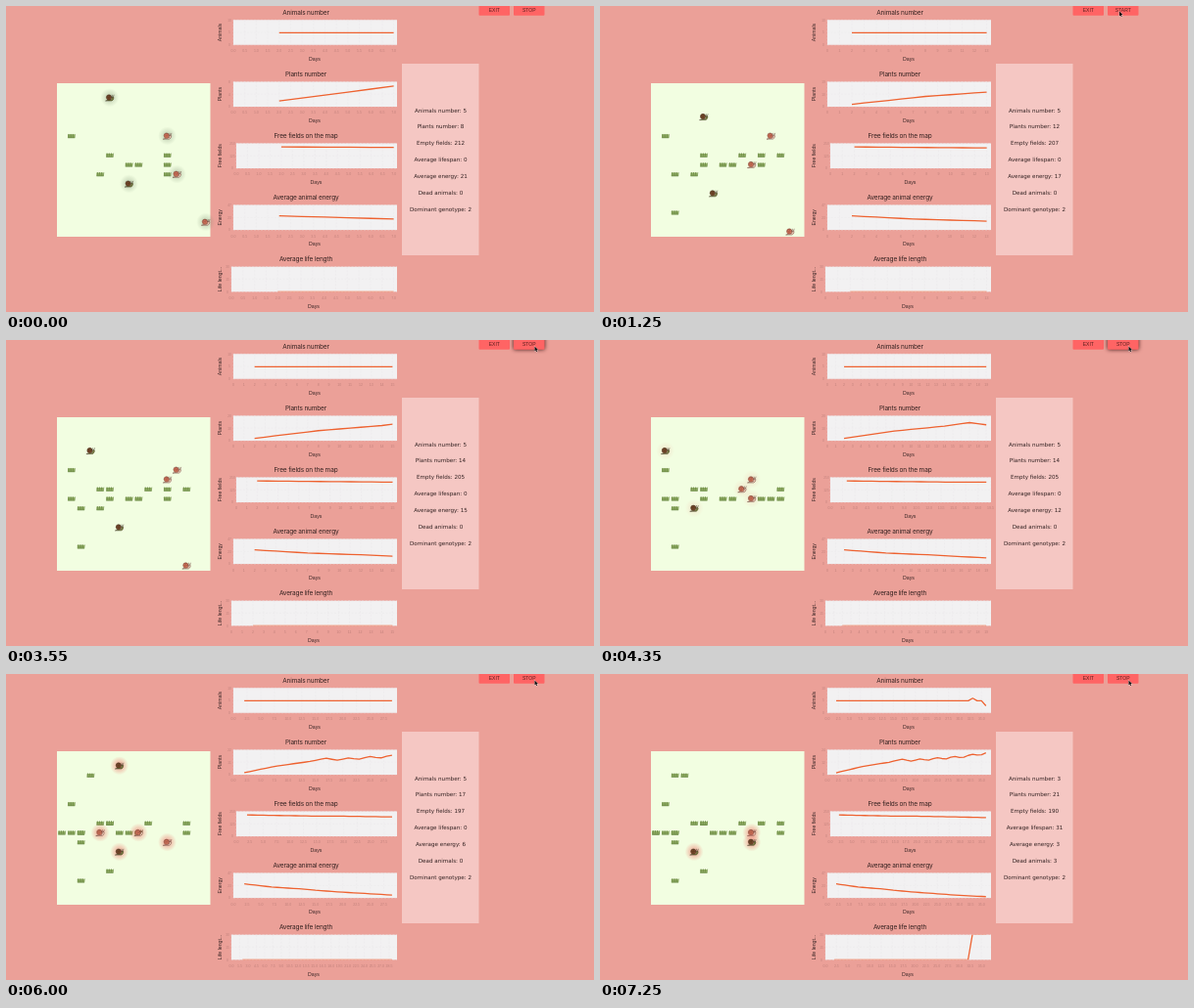
Write an HTML page with a canvas that moves like this. It is 600 by 313 pixels and loops after 7.3 s.

```html
<!DOCTYPE html>
<html lang="en">
<head>
<meta charset="utf-8">
<title>Animal simulation</title>
<style>
html, body { margin: 0; width: 100%; height: 100%; overflow: hidden; background: #eba098; }
canvas { display: block; width: 600px; height: 313px; }
</style>
</head>
<body>
<canvas id="stage"></canvas>
<script>
const LOOP = 7300, STEP = 50, RESUME = 3190;
const TITLE = 'Inter, Arial, sans-serif';
const SANS = '"Liberation Sans", Arial, sans-serif';
const WIDE = '"DejaVu Sans", Verdana, sans-serif';
const canvas = document.getElementById('stage');
const ctx = canvas.getContext('2d');
const dpr = window.devicePixelRatio || 1;
canvas.width = 600 * dpr;
canvas.height = 313 * dpr;

const clamp = v => Math.max(0, Math.min(1, v));
const ease = v => v * v * (3 - 2 * v);
const mix = (a, b, k) => a + (b - a) * k;
const random = n => { const v = Math.sin(n * 12.9898) * 43758.5453; return v - Math.floor(v); };

// Piecewise linear value through the points (xs[i], ys[i])
function lerp(xs, ys, x) {
  if (x <= xs[0]) return ys[0];
  for (let i = 1; i < ys.length; i++)
    if (x < xs[i]) return mix(ys[i - 1], ys[i], (x - xs[i - 1]) / (xs[i] - xs[i - 1]));
  return ys[ys.length - 1];
}

// Simulated day: runs, pauses on day 13, runs again
const dayAt = t => t < RESUME
  ? 7 + Math.min(6, Math.floor(t / 172))
  : 13 + Math.floor((t - RESUME) / 175);

// Key days of the simulation; values between them are interpolated
const stops = [7, 13, 15, 19, 29, 36];
const census = (...values) => d => lerp([1, ...stops], values, d);
const plantCount = census(2, 8, 12, 14, 14, 17, 21);
const emptyCount = census(218, 212, 207, 205, 205, 197, 190);
const energy = census(28, 21, 17, 15, 12, 6, 3);
const lifespan = d => d < 33 ? 0 : 31;

// Cell of each snail at the key days
const snails = [
  { dark: true, cols: [5, 5, 3, 1, 6, 8], rows: [1, 3, 3, 3, 1, 3], dies: 34 },
  { cols: [11, 12, 12, 10, 11, 10], rows: [5, 5, 5, 6, 9, 8] },
  { cols: [12, 10, 11, 9, 4, 3], rows: [9, 8, 6, 7, 8, 11], dies: 36 },
  { dark: true, cols: [7, 6, 6, 4, 6, 4], rows: [10, 11, 11, 9, 10, 10] },
  { cols: [15, 14, 13, 10, 8, 9], rows: [14, 15, 15, 8, 8, 10], dies: 36 },
  { dark: true, cols: [10], rows: [9], born: 33 }
];
const isDead = (s, d) => d >= (s.dies || Infinity);
const living = d => snails.filter(s => d >= (s.born || 0) && !isDead(s, d));

// Column, row and, where eaten, the day; in order of growth
const plants = [
  [1, 5], [5, 7], [4, 9, 17], [7, 8], [8, 8, 30], [11, 7, 18], [11, 8, 24], [11, 9, 9],
  [5, 8, 26], [2, 9], [9, 7, 19], [13, 7], [2, 13], [4, 7], [1, 8], [2, 8, 32],
  [12, 8, 25], [13, 8]
];
// Later plants sprout at random, mostly around the equator
for (let i = plants.length; i < 30; i++) {
  const row = i % 4 ? 7 + random(i) * 3 : random(i) * 16;
  plants.push([Math.floor(random(i + 50) * 16), Math.floor(row)]);
}
const sprout = i => i < 8 ? 0 : Math.floor(8 + (i - 8) * 1.25);

const charts = [
  { title: 'Animals number', label: 'Animals', left: 232, top: () => 10,
    value: d => living(d).length },
  { title: 'Plants number', label: 'Plants', left: 232,
    top: d => d < 10 ? 1.2 * d : 16.5 + .2 * d,
    value: d => plantCount(d - 1) + (d > 15 ? .9 * Math.sin((d - 16) * 1.6) : 0) },
  { title: 'Free fields on the map', label: 'Free fields', left: 235, top: () => 250,
    value: emptyCount },
  { title: 'Average animal energy', label: 'Energy', left: 232, top: () => 46.5, value: energy },
  { title: 'Average life length', label: 'Life lengt...', left: 230, top: () => 30,
    value: lifespan }
];

// Pointer moves: begin, end, target x, target y
const moves = [[700, 1000, 530, 5.5], [1350, 1750, 153, 162],
  [1850, 2200, 186, 46], [2300, 3050, 539.5, 6.5]];

function text(str, x, y, size, family, color = '#3a2626') {
  ctx.font = size + 'px ' + family;
  ctx.fillStyle = color;
  ctx.textAlign = 'center';
  ctx.textBaseline = 'middle';
  ctx.fillText(str, x, y + .5);
}
function lines(list, x, y, gap, size) {
  list.forEach((s, i) => text(s, x, y + i * gap, size, WIDE, '#332222'));
}
function box(x, y, w, h, color, r = 0) {
  ctx.fillStyle = color;
  ctx.beginPath();
  ctx.roundRect(x, y, w, h, r);
  ctx.fill();
}
function disc(x, y, r, color) {
  ctx.fillStyle = color;
  ctx.beginPath();
  ctx.arc(x, y, r, 0, 7);
  ctx.fill();
}

function drawChart(c, i, day) {
  const y = 14.3 + i * 63.1, h = 25.5, right = 399, w = right - c.left;
  const unit = w / (1.035 * day - .1);
  const top = c.top(day);
  ctx.letterSpacing = '-0.16px';
  text(c.title, 306, y - 7.8, 6.5, TITLE, '#33201f');
  ctx.letterSpacing = '0px';
  text('Days', (c.left + right) / 2 - .5, y + 39.9, 5.2, SANS);
  ctx.save();
  ctx.translate(218, y + h / 2);
  ctx.rotate(-Math.PI / 2);
  text(c.label, 0, 0, 5.2, SANS);
  ctx.restore();

  box(c.left, y, w, h, '#f2f1f2');
  const faint = 'rgba(120,75,75,.36)';
  const step = [.5, 1, 1.5, 2.5].find(s => s * unit >= 8.4) || 5;
  ctx.strokeStyle = '#e8e6e7';
  ctx.lineWidth = .4;
  ctx.setLineDash([2, 1.5]);
  ctx.beginPath();
  for (let x = 0; x * unit <= w + .1; x += step) {
    ctx.moveTo(c.left + x * unit, y);
    ctx.lineTo(c.left + x * unit, y + h);
    text(x.toFixed(step % 1 ? 1 : 0), c.left + x * unit, y + 31.5, 3.5, SANS, faint);
  }
  for (let k = 0; k <= 1; k += .5) {
    ctx.moveTo(c.left, y + h * k);
    ctx.lineTo(right, y + h * k);
    text(Math.round(top * (1 - k)), c.left - 4, y + h * k, 3.2, SANS, faint);
  }
  ctx.stroke();
  ctx.setLineDash([]);

  ctx.save();
  ctx.beginPath();
  ctx.rect(c.left, y, w + .5, h);
  ctx.clip();
  ctx.beginPath();
  for (let d = 2; d <= day; d++)
    ctx.lineTo(c.left + d * unit, y + .3 + h * (1 - c.value(d) / top));
  ctx.strokeStyle = '#ee6230';
  ctx.lineWidth = 1.3;
  ctx.lineJoin = 'round';
  ctx.stroke();
  ctx.restore();
}

function drawPlant(x, y) {
  box(x - 3.6, y - 1.5, 7.2, 3.6, '#9cb76a', .6);
  ctx.strokeStyle = '#5c7d3c';
  ctx.lineWidth = .5;
  ctx.beginPath();
  for (let k = -3; k <= 3; k++) {
    ctx.moveTo(x + k * 1.1, y + 2);
    ctx.lineTo(x + k * 1.1 + (k % 2 ? .5 : -.5), y - 1.9);
  }
  ctx.moveTo(x - 3.6, y + 2);
  ctx.lineTo(x + 3.6, y + 2);
  ctx.stroke();
}

// Unit design is about 21 by 17
function drawSnail(x, y, scale, dark) {
  ctx.save();
  ctx.translate(x, y);
  ctx.scale(scale, scale);
  ctx.strokeStyle = dark ? '#33281a' : '#5a2c25';
  ctx.lineWidth = scale < 1 ? 1.1 : .7;
  ctx.lineCap = 'round';
  ctx.fillStyle = dark ? '#7d8540' : '#f9d8c2';
  ctx.beginPath();
  ctx.moveTo(-10, 8);
  ctx.quadraticCurveTo(-3, 5, 4, 5.5);
  ctx.quadraticCurveTo(6, 3, 5.5, 0);
  ctx.quadraticCurveTo(8, -3.5, 10.5, 0);
  ctx.quadraticCurveTo(9.5, 7, 6, 8);
  ctx.closePath();
  ctx.fill();
  ctx.stroke();
  ctx.beginPath();
  ctx.moveTo(7, -1.5);
  ctx.lineTo(6, -6.5);
  ctx.moveTo(9, -1.5);
  ctx.lineTo(10.5, -6.5);
  ctx.stroke();
  disc(-2, -.7, 6.6, dark ? '#8a5230' : '#f0886a');
  ctx.stroke();
  ctx.beginPath();
  for (let a = 0; a < 12.5; a += .3) {
    const r = .4 + a * .42;
    ctx.lineTo(-2 + r * Math.cos(a), -.7 + r * Math.sin(a));
  }
  ctx.stroke();
  ctx.restore();
}

// Grey while well fed, red when starving
function drawGlow(x, y, day) {
  const grey = clamp((10 - day) / 3) * .4, red = clamp((day - 16) / 12) * .55;
  const tone = grey ? '120,140,110' : '238,95,85';
  const g = ctx.createRadialGradient(x, y, 1, x, y, 9.5);
  g.addColorStop(0, `rgba(${tone},${grey + red})`);
  g.addColorStop(1, `rgba(${tone},0)`);
  disc(x, y, 9.5, g);
}

function drawMap(day) {
  const place = n => 9.79 * (n + .5);
  box(52, 79, 156.5, 157, '#f2fee1');
  plants.forEach(([col, row, eaten = Infinity], i) => {
    if (day >= sprout(i) && day < eaten) drawPlant(52 + place(col), 79 + place(row));
  });
  living(day).forEach(s => {
    const x = 52 + place(Math.round(lerp(stops, s.cols, day)));
    const y = 79 + place(Math.round(lerp(stops, s.rows, day)));
    drawGlow(x, y, day);
    drawSnail(x, y, .4, s.dark);
  });
}

function drawStats(day) {
  box(404, 59, 78.5, 196, '#f5c7c3');
  lines([
    'Animals number: ' + living(day).length,
    'Plants number: ' + Math.round(plantCount(day)),
    'Empty fields: ' + Math.round(emptyCount(day)),
    'Average lifespan: ' + lifespan(day),
    'Average energy: ' + Math.round(energy(day)),
    'Dead animals: ' + snails.filter(s => isDead(s, day)).length,
    'Dominant genotype: 2'
  ], 443.5, 106.6, 16.9, 5.6);
}

function drawButton(label, x, lit) {
  ctx.save();
  if (lit) {
    ctx.shadowColor = 'rgba(40,0,0,.9)';
    ctx.shadowBlur = 4 * dpr;
  }
  box(x, -4, 31.5, 13.8, '#ff6464', 1);
  ctx.restore();
  text(label, x + 15.8, 4.6, 5, SANS, '#5a1f1f');
}

function drawPopup() {
  ctx.save();
  ctx.shadowColor = 'rgba(30,5,5,.8)';
  ctx.shadowBlur = 20 * dpr;
  ctx.shadowOffsetY = 6 * dpr;
  box(181, 37.5, 157.3, 168.7, '#f5c6c3', 4);
  ctx.restore();
  ctx.strokeStyle = '#7d5a57';
  ctx.lineWidth = .5;
  ctx.stroke();
  box(181, 37.5, 157.3, 12.3, '#554946', [4, 4, 0, 0]);
  ['#f25a50', '#eea035', '#4fb03c'].forEach((c, i) => disc(187 + i * 7.8, 44, 2.5, c));
  lines(['Animal information'], 259.5, 81.2, 0, 9.4);
  lines([
    'Genotype: 12631021204142534603754430754663',
    'Active Gen: 5',
    'Current energy: 16',
    'Eaten plants: 0',
    'Children number: 0',
    'Days of life: 13',
    'Animal is still alive'
  ], 259.7, 114.3, 7.05, 5.5);
  drawSnail(259.7, 169.7, 1, false);
}

function drawPointer(t) {
  let x = 530, y = -12;
  for (const [begin, end, toX, toY] of moves) {
    const k = ease(clamp((t - begin) / (end - begin)));
    x = mix(x, toX, k);
    y = mix(y, toY, k);
  }
  ctx.save();
  ctx.translate(x, y);
  ctx.beginPath();
  [[0, 0], [0, 4.8], [1.1, 3.9], [1.9, 5.6], [2.7, 5.2], [1.9, 3.6], [3.5, 3.5]]
    .forEach(p => ctx.lineTo(...p));
  ctx.closePath();
  ctx.strokeStyle = 'rgba(255,255,255,.7)';
  ctx.lineWidth = .7;
  ctx.stroke();
  ctx.fillStyle = '#111';
  ctx.fill();
  ctx.restore();
}

const start = performance.now();
function draw(now) {
  const t = Math.floor(Math.max(0, now - start) % LOOP / STEP) * STEP;
  const day = dayAt(t);
  ctx.setTransform(dpr, 0, 0, dpr, 0, 0);
  box(0, 0, 600, 313, '#eba098');
  charts.forEach((c, i) => drawChart(c, i, day));
  drawStats(day);
  drawMap(day);
  drawButton('EXIT', 482.5, false);
  drawButton(t >= 1150 && t < 3150 ? 'START' : 'STOP', 518, t >= 3050 && t < 4900);
  if (t >= 1800 && t < 2350) drawPopup();
  drawPointer(t);
  requestAnimationFrame(draw);
}
draw(start);
</script>
</body>
</html>
```
